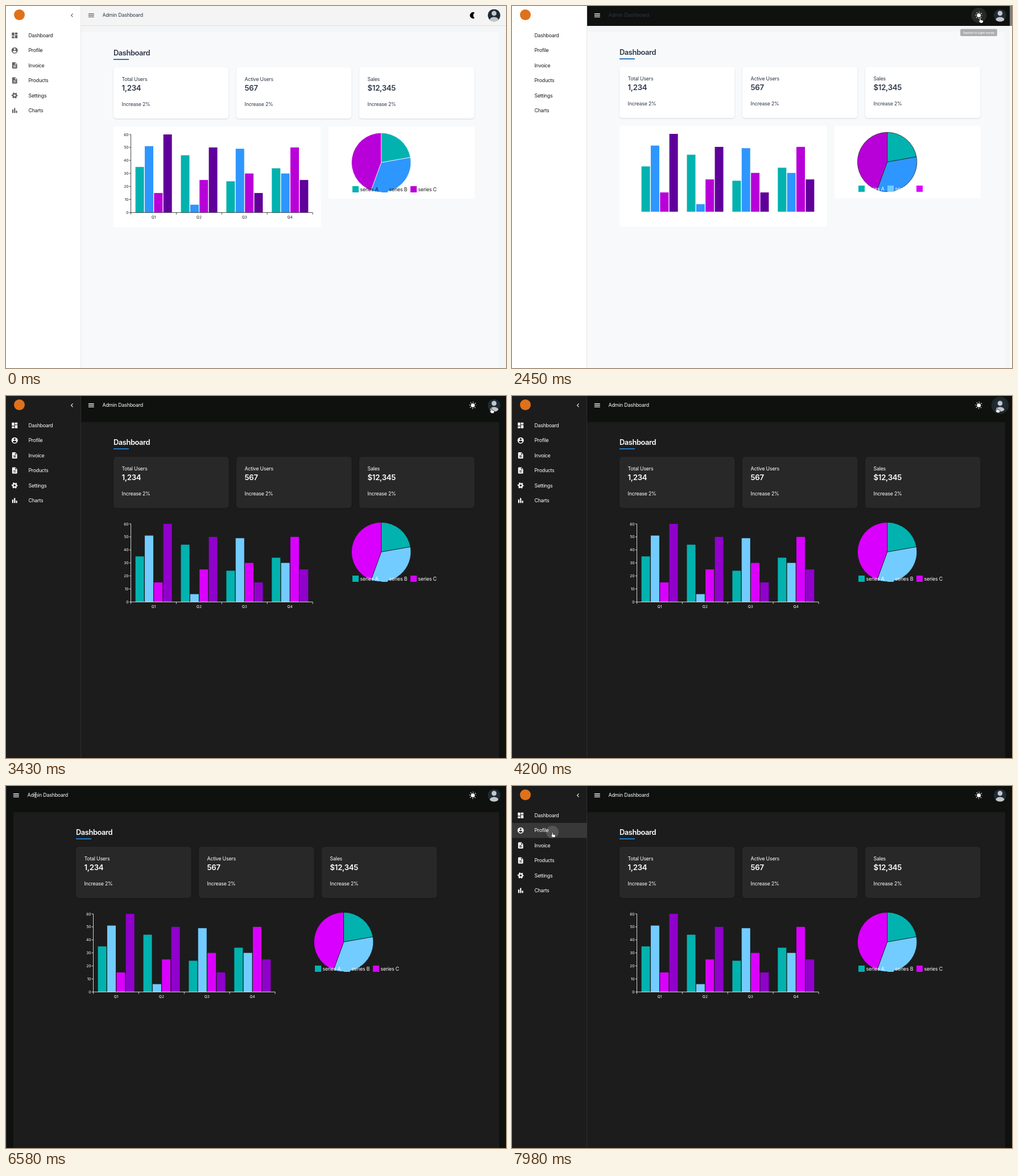
Animation, 879 px wide and 637 px high, one loop 8 s. Source, as an HTML page:

```html
<!DOCTYPE html>
<html lang="en">
<head>
<meta charset="utf-8">
<title>Admin Dashboard</title>
<style>
  html, body { margin: 0; width: 100%; height: 100%; overflow: hidden; }
  svg { display: block; width: 879px; height: 637px; background: var(--page); }
  text { font: 8.8px Inter, "Liberation Sans", sans-serif; letter-spacing: -.022em; fill: var(--text); }
  .h { font-size: 12.8px; font-weight: 600; letter-spacing: -.03em; }
  .num { font-size: 13.2px; font-weight: 600; letter-spacing: -.02em; }
  .nav { letter-spacing: -.03em; fill: var(--navText); }
  .axis { font-size: 6.6px; letter-spacing: 0; fill: var(--ink); }
  .legend { fill: var(--ink); }
  .mail { font-size: 7.7px; opacity: .65; }
  .tip { font-size: 6.05px; font-weight: 500; letter-spacing: 0; fill: #fff; }
  .mid { text-anchor: middle; }
  .end { text-anchor: end; }
  .icon { fill: var(--icon); }
  .line { fill: none; stroke: var(--icon); stroke-width: 2; }
  .axes { fill: none; stroke: var(--ink); stroke-width: .8; }
  .rule { stroke: var(--rule); stroke-width: .8; }
  .card { fill: var(--card); filter: drop-shadow(0 1px 1.2px rgba(0,0,0,.13)); }
  .paper { fill: var(--paper); }
</style>
</head>
<body>
<svg id="stage" viewBox="0 0 879 637" xmlns="http://www.w3.org/2000/svg"></svg>
<script>
const LOOP = 8000, STEP = 70, SWITCH = 2450;

// name: [light, dark, fade time in ms]
const THEME = {
  page: ['#f4f5f6', '#0e110e', 200], panel: ['#f7f9fb', '#1c1c1c', 180],
  head: ['#f4f4f4', '#0e110e', 0], headLine: ['#dedede', '#0e110e', 0],
  drawer: ['#ffffff', '#1c1c1c', 180], rule: ['#e0e0e0', '#363636', 180], edge: ['#ffffff', '#2c2c2c', 180],
  text: ['#2d3748', '#ffffff', 180], navText: ['#1c1c1c', '#ffffff', 180],
  icon: ['#616161', '#ffffff', 0], ink: ['#1c1c1c', '#ffffff', 0], toggle: ['#000000', '#ffffff', 0],
  card: ['#ffffff', '#282828', 180], paper: ['#ffffff', '#1c1c1c', 180], mark: ['#3474b8', '#1f78c4', 180],
  c0: ['#02b2af', '#02b2af', 290], c1: ['#2e96ff', '#72ccff', 290],
  c2: ['#b800d8', '#da00ff', 290], c3: ['#60009b', '#9001cb', 290],
  k0: ['#02b2af', '#02b2af', 0], k1: ['#2e96ff', '#72ccff', 0], k2: ['#b800d8', '#da00ff', 0],
  gap: ['#ffffff', '#161616', 0]
};

const ICONS = {
  board: '<path d="M3 13h8V3H3zm0 8h8v-6H3zm10 0h8V11h-8zm0-18v6h8V3z"/>',
  user: '<path d="M12 2a10 10 0 1 0 0 20 10 10 0 0 0 0-20zm0 3a3 3 0 1 1 0 6 3 3 0 0 1 0-6zm0 14.2c-2.5 0-4.7-1.3-6-3.2 0-2 4-3.1 6-3.1s6 1.100 6 3.100c-1.300 1.900-3.500 3.200-6 3.200z"/>',
  doc: '<path d="M14 2H6a2 2 0 0 0-2 2v16a2 2 0 0 0 2 2h12a2 2 0 0 0 2-2V8zm2 16H8v-2h8zm0-4H8v-2h8zm-3-5V3.500L18.500 9z"/>',
  gear: '<g class="line"><circle cx="12" cy="12" r="5.300" style="stroke-width:4"/><circle cx="12" cy="12" r="8.300" style="stroke-width:3" stroke-dasharray="4.400 4.290" stroke-dashoffset="2.200"/></g>',
  bars: '<path d="M4 9h4v11H4zm12 4h4v7h-4zm-6-9h4v16h-4z"/>',
  menu: '<path d="M3 18h18v-2H3zm0-5h18v-2H3zm0-7v2h18V6z"/>',
  back: '<path d="M15.400 7.400 14 6l-6 6 6 6 1.400-1.400-4.600-4.600z"/>',
  dollar: '<path class="line" d="M16 8.500Q15.500 6 12 6T8 8.800Q8 11 12 12t4 3.200Q16 18 12 18t-4-2.500M12 3v3m0 12v3"/>',
  help: '<path d="M12 2a10 10 0 1 0 0 20 10 10 0 0 0 0-20zm1 17h-2v-2h2zm2.100-7.750-.9.920C13.450 12.900 13 13.500 13 15h-2c0-1.600.450-2.600 1.200-3.330l1.200-1.260A2 2 0 1 0 10 9H8a4 4 0 1 1 7.100 2.250z"/>',
  price: '<path class="line" d="M11 4H5v4h5v4H4m3.500-10v2m0 8v2m3.500 3 4 4 7-7"/>',
  exit: '<path class="line" d="M12 4H3v16h9M8 12h12m-4-5 5 5-5 5"/>'
};

const icon = (name, x, y) =>
  `<g class="icon" transform="translate(${x - 6.6} ${y - 6.6}) scale(.55)">${ICONS[name]}</g>`;
const text = (x, y, s, cls = '') => `<text x="${x}" y="${y}" class="${cls}">${s}</text>`;
const rect = (x, y, w, h, attrs) => `<rect x="${x}" y="${y}" width="${w}" height="${h}" ${attrs}/>`;
const fill = name => `style="fill:var(--${name})"`;
const list = (n, f) => Array.from({ length: n }, (_, i) => f(i)).join('');

const avatar = (x, y) => `<g transform="translate(${x} ${y})" clip-path="url(#disc)">
  <circle r="11" fill="#1f2b35"/><circle cy="-3.500" r="4.300" fill="#c3c6c9"/>
  <ellipse cy="8" rx="7.600" ry="5.200" fill="#c3c6c9"/></g>`;

function cards() {
  return [['Total Users', '1,234'], ['Active Users', '567'], ['Sales', '$12,345']].map(([label, value], i) => {
    const x = 189 + 216 * i;
    return rect(x, 107, 202.5, 90, 'rx="5" class="card"') + text(x + 14.5, 131, label) +
      text(x + 14.5, 148.2, value, 'num') + text(x + 14.5, 174.5, 'Increase 2%');
  }).join('');
}

function barChart() {
  const data = [[35, 44, 24, 34], [51, 6, 49, 30], [15, 25, 30, 50], [60, 50, 15, 25]];
  const base = 362.4, unit = 2.29, group = 79.9;
  const bars = data.map((row, s) => row.map((v, q) =>
    rect(227.6 + q * group + s * 16.35, base - v * unit, 15, v * unit, fill('c' + s))).join('')).join('');
  const yTicks = list(7, i => {
    const y = base - i * 10 * unit;
    return `<path class="axes" d="M216.500 ${y}h3"/>` + text(215.5, y + 2.5, i * 10, 'axis end');
  });
  const xTicks = list(5, i => `<path class="axes" d="M${219.5 + i * group} ${base}v3.500"/>`);
  const labels = list(4, i => text(259.5 + i * group, 373, 'Q' + (i + 1), 'axis mid'));
  return rect(189, 211, 364.5, 177, 'class="paper"') + bars + yTicks + xTicks + labels +
    `<path class="axes" d="M219.500 225V${base}H539"/>`;
}

function pieChart() {
  const cx = 659.6, cy = 274.5, r = 52.2;
  const at = deg => {
    const a = deg * Math.PI / 180;
    return `${cx + r * Math.sin(a)} ${cy - r * Math.cos(a)}`;
  };
  const slices = [[0, 80], [80, 200], [200, 360]].map(([a, b], i) =>
    `<path d="M${cx} ${cy}L${at(a)}A${r} ${r} 0 0 1 ${at(b)}Z" stroke-width=".7" style="fill:var(--c${i});stroke:var(--gap)"/>`);
  const legend = list(3, i => rect(609 + 51 * i, 316, 11, 11, fill('k' + i)) +
    text(622.5 + 51 * i, 324.7, 'series ' + 'ABC'[i], 'legend'));
  return rect(567, 211, 257, 127, 'class="paper"') + slices.join('') + legend;
}

function drawer() {
  const items = [['board', 'Dashboard'], ['user', 'Profile'], ['doc', 'Invoice'],
    ['doc', 'Products'], ['gear', 'Settings'], ['bars', 'Charts']];
  return rect(0, 0, 132, 637, fill('drawer')) + '<path class="rule" d="M131.600 0v637"/>' +
    '<circle cx="23.500" cy="15.500" r="9.500" fill="#df711b"/>' + icon('back', 116, 16.4) +
    rect(0, 0, 131.5, 26.4, 'id="row" fill="#808080" fill-opacity=".28"') +
    '<circle id="ripple" cx="71" cy="81" r="11" fill="#999" opacity=".3"/>' +
    items.map(([name, label], i) => icon(name, 15.2, 51.8 + 26.4 * i) +
      text(39.5, 55 + 26.4 * i, label, 'nav')).join('');
}

function userMenu() {
  const items = [['user', 'My Profile', 98.5], ['gear', 'Settings', 120.5], ['dollar', 'Invoice', 142.5],
    ['help', 'FAQ', 174], ['price', 'Pricing', 196], ['exit', 'Logout', 227.2]];
  return rect(734, 38.5, 137, 204, 'rx="2" class="card"') + avatar(753.5, 61) +
    text(773, 58.4, 'Odel Varn') + text(773, 70.8, 'odel@varn.test', 'mail') +
    [82.5, 158, 211.5].map(y => `<path class="rule" d="M734 ${y}h137"/>`).join('') +
    items.map(([name, label, y]) => icon(name, 749, y) + text(764, y + 3.2, label)).join('') +
    '<circle cx="857" cy="142.500" r="5.500" fill="#f44336"/>' +
    '<text x="857" y="144.800" class="mid" style="font-size:6.500px;fill:#fff">3</text>';
}

const stage = document.getElementById('stage');
stage.innerHTML = `
  <defs><clipPath id="disc"><circle r="11"/></clipPath></defs>
  ${rect(132, 46, 735, 600, `id="panel" rx="3" ${fill('panel')}`)}
  <g id="content">${text(189, 85.5, 'Dashboard', 'h')}${rect(189, 92, 27, 2, fill('mark'))}
    ${cards()}${barChart()}${pieChart()}</g>
  ${rect(0, 0, 879, 35, fill('head'))}${rect(0, 34, 879, 1, fill('headLine'))}
  <g id="title"><circle id="menuHover" cx="149.800" cy="16.400" r="10.800" ${fill('ink')}/>
    ${icon('menu', 149.8, 16.4)}${text(169.5, 19.2, 'Admin Dashboard')}</g>
  ${rect(0, 0, 1, 637, fill('edge'))}
  <g id="drawer">${drawer()}</g>
  <circle id="modeHover" cx="820.700" cy="16.400" ${fill('ink')}/>
  <path id="moon" d="M824 11.800A5.500 5.500 0 1 0 824 21.200A5.600 5.600 0 0 1 824 11.800Z" ${fill('toggle')}/>
  <g id="sun" transform="translate(820.700 16.400)"><circle r="3.400" fill="#fff"/>
    <circle r="5.500" fill="none" stroke="#fff" stroke-width="1.500" stroke-dasharray="1.300 3.020" stroke-dashoffset=".65"/></g>
  <circle id="userHover" cx="858" cy="16.400" r="15.300" fill="#7f9ab0"/>
  ${avatar(858, 16.4)}
  ${rect(875, 0, 4, 637, 'id="scroll" fill="#fff"')}
  <g id="tip">${rect(-34.5, 0, 69, 14, 'rx="2" fill="#616161"')}${text(0, 9.2, 'Switch to light mode', 'tip mid')}</g>
  <g id="menu">${userMenu()}</g>
  <g id="cursor" stroke-width=".7" stroke-linejoin="round">
    <path id="arrow" d="M0 0V9L2 7.200L3.400 10L4.700 9.400L3.400 6.700H6Z" fill="#000" stroke="#fff"/>
    <path id="hand" d="M-1 .8Q0-.7 1 .8V3.800L4.800 4.800Q5.800 5.300 5.400 7L4.500 9.600H.2L-2.800 6Q-2.600 4.300-1 5.600Z" fill="#fff" stroke="#000"/>
    <path id="beam" d="M-2-4.500Q0-4.500 0-3Q0-4.500 2-4.500M0-3V3M-2 4.500Q0 4.500 0 3Q0 4.500 2 4.500M-1.200 1H1.200" fill="none" stroke="#ccc" stroke-width="1"/>
  </g>`;

const el = id => document.getElementById(id);
const set = (id, attrs) => { for (const k in attrs) el(id).setAttribute(k, attrs[k]); };
const span = (t, from, len) => len ? Math.min(1, Math.max(0, (t - from) / len)) : +(t >= from);
const out = p => 1 - (1 - p) ** 2;
const smooth = p => p * p * (3 - 2 * p);
const shown = (t, on, off, len = 210) => out(span(t, on, len)) * (1 - out(span(t, off, len)));
const rgb = hex => [1, 3, 5].map(i => parseInt(hex.substr(i, 2), 16));

function mix(a, b, p) {
  const to = rgb(b);
  return `rgb(${rgb(a).map((v, i) => Math.round(v + (to[i] - v) * p))})`;
}

// time, x, y, shape
const PATH = [
  [280, 872, 33, 'arrow'], [490, 860, 24, 'hand'], [700, 854, 21, 'hand'], [1820, 854, 21, 'arrow'],
  [2030, 830, 26, 'arrow'], [2240, 823, 20.5, 'hand'], [2450, 823, 20.5, 'hand'], [2590, 853, 21, 'hand'],
  [3430, 853, 21, 'hand'], [3640, 852.5, 20, 'hand'], [4550, 852.5, 20, 'arrow'], [4970, 202, 18, 'arrow'],
  [5110, 151, 15.5, 'hand'], [6160, 151, 15.5, 'arrow'], [6510, 52, 16, 'beam'], [6720, 52, 16, 'beam'],
  [6860, 20, 16, 'hand'], [6930, 17, 15, 'hand'], [7350, 17, 15, 'hand'], [7840, 71, 81, 'hand'], [LOOP, 71, 81, 'hand']
];

function pointer(t) {
  const i = PATH.findIndex(k => k[0] > t) - 1;
  if (i < 0) return null;
  const [t0, x0, y0, shape] = PATH[i], [t1, x1, y1] = PATH[i + 1];
  const p = smooth((t - t0) / (t1 - t0));
  return { x: x0 + (x1 - x0) * p, y: y0 + (y1 - y0) * p, shape };
}

function draw(t) {
  const dark = t >= SWITCH;
  for (const name in THEME) {
    const [a, b, len] = THEME[name];
    stage.style.setProperty('--' + name, mix(a, b, out(span(t, SWITCH, len))));
  }
  set('moon', { opacity: +!dark });
  set('sun', { opacity: +dark });

  const shut = smooth(span(t, 5900, 220)) - smooth(span(t, 7080, 220));
  set('panel', { x: 132 - 119 * shut, width: 735 + 119 * shut });
  set('content', { transform: `translate(${-66 * shut} ${dark ? 0 : 1})` });
  set('title', { transform: `translate(${-132 * shut})` });
  set('drawer', { transform: `translate(${-132 * shut})` });

  set('menuHover', { opacity: .1 * (shown(t, 5670, 5950) + shown(t, 6790, 7140)) });
  set('userHover', { opacity: .16 * (shown(t, 980, 1820, 140) + shown(t, 3920, 4200, 140)) });
  set('modeHover', { r: 13.5 - 3 * span(t, SWITCH, 140), opacity: .1 * shown(t, 2200, 2600, 140) });
  set('scroll', { opacity: dark ? .45 * (1 - span(t, 3010, 210)) : 0 });

  const grow = out(span(t, 2350, 200));
  set('tip', {
    transform: `translate(820.500 ${42 - 6 * (1 - grow)}) scale(${.75 + .25 * grow} ${.56 + .44 * grow})`,
    opacity: .65 * grow * (1 - span(t, 2590, 210))
  });

  const open = shown(t, 1200, 1990) + shown(t, 4210, 5530), size = .75 + .25 * open;
  set('menu', { opacity: open, transform: `translate(871 38) scale(${size}) translate(-871 -38)` });

  const c = pointer(t);
  const row = c && !shut && c.x < 132 ? Math.floor((c.y - 38.6) / 26.4) : -1;
  set('row', { y: 38.6 + 26.4 * row, opacity: +(row >= 0) });
  set('ripple', { opacity: t >= 7980 ? .3 : 0 });
  set('cursor', { opacity: +!!c });
  if (c) {
    set('cursor', { transform: `translate(${c.x} ${c.y})` });
    for (const s of ['arrow', 'hand', 'beam']) set(s, { opacity: +(s === c.shape) });
  }
}

const start = performance.now();
function frame() {
  const t = (performance.now() - start) % LOOP;
  draw(Math.floor(t / STEP) * STEP);
  requestAnimationFrame(frame);
}
frame();
</script>
</body>
</html>
```
